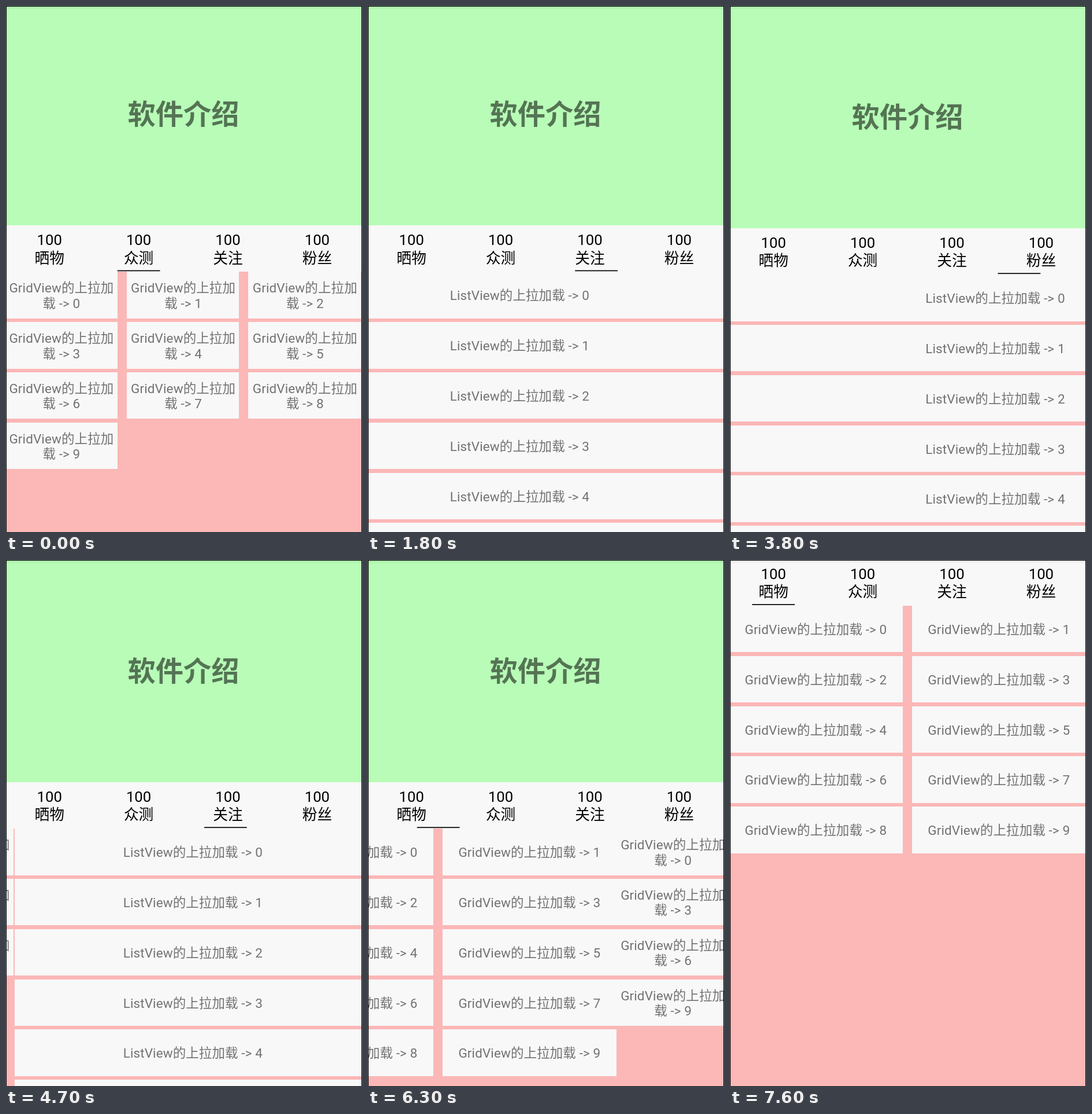
Animation of 616 by 909 pixels, one loop 8000 ms. Source, as an HTML page:

```html
<!DOCTYPE html>
<html lang="zh-CN">
<head>
<meta charset="utf-8">
<title>软件介绍</title>
<style>
  html, body { margin: 0; width: 100%; height: 100%; overflow: hidden; background: #fcb7b7; }
  svg { display: block; width: 616px; height: 909px; }
  rect { shape-rendering: crispEdges; }
  #underline { shape-rendering: auto; }
  text {
    font-family: Roboto, "Noto Sans CJK SC", "Noto Sans CJK", "Noto Sans CJK JP", sans-serif;
    font-kerning: none;
    text-anchor: middle;
  }
  .title { font-size: 48.25px; font-weight: 700; fill: rgba(0, 0, 0, .54); }
  .tab { font-size: 25.7px; }
  .cell { font-size: 22.5px; letter-spacing: .1px; fill: rgba(0, 0, 0, .54); }
</style>
</head>
<body>
<svg viewBox="0 0 616 909">
  <linearGradient id="shadow" x2="0" y2="1">
    <stop stop-opacity=".1"/>
    <stop offset="1" stop-opacity="0"/>
  </linearGradient>
  <rect width="616" height="909" fill="#fcb7b7"/>
  <g id="content">
    <g id="pages"></g>
    <rect y="-4" width="616" height="388" fill="#b8fcb7"/>
    <text class="title" x="307" y="209">软件介绍</text>
    <g id="tabs"><rect y="383.8" width="616" height="80.4" fill="#f8f8f8"/></g>
    <rect id="underline" y="461.4" width="73.8" height="1.7"/>
  </g>
  <rect width="616" height="6" fill="url(#shadow)"/>
  <path d="M0 0H616V909H615V1H1V909H0Z"/>
</svg>
<script>
const LOOP = 8000, STEP = 100;
const PAGE_WIDTH = 617.6, LEFT = -2, TAB_WIDTH = PAGE_WIDTH / 4, UNDERLINE_WIDTH = 73.8;
const ROWS_TOP = 464.2, ROW_HEIGHT = 80.4, ROW_PITCH = 86.8, COLUMN_GAP = 16.1;
const byId = id => document.getElementById(id);

function add(parent, name, attrs, text = '') {
  const node = document.createElementNS('http://www.w3.org/2000/svg', name);
  for (const key in attrs) node.setAttribute(key, attrs[key]);
  node.textContent = text;
  parent.append(node);
  return node;
}

function addText(parent, cls, x, y, text) {
  add(parent, 'text', { class: cls, x, y }, text);
}

function addPage(index, columns, cellWidth, label, wrap) {
  const page = add(byId('pages'), 'g', { transform: `translate(${index * PAGE_WIDTH} 0)` });
  for (let i = 0; i < 10; i++) {
    const x = (i % columns) * (cellWidth + COLUMN_GAP);
    const y = Math.floor(i / columns) * ROW_PITCH;
    const center = x + cellWidth / 2;
    add(page, 'rect', { x, y, width: cellWidth, height: ROW_HEIGHT, fill: '#f8f8f8' });
    if (wrap) {
      addText(page, 'cell', center + .6, y + 36, label + '的上拉加');
      addText(page, 'cell', center + .6, y + 62.4, '载 -> ' + i);
    } else {
      addText(page, 'cell', center, y + 49, label + '的上拉加载 -> ' + i);
    }
  }
}

addPage(0, 2, (PAGE_WIDTH - COLUMN_GAP) / 2, 'GridView', false);
addPage(1, 3, 194.6, 'GridView', true);
addPage(2, 1, PAGE_WIDTH, 'ListView', false);
addPage(3, 1, PAGE_WIDTH, 'ListView', false);

['晒物', '众测', '关注', '粉丝'].forEach((label, i) => {
  const x = LEFT + TAB_WIDTH * (i + .5);
  addText(byId('tabs'), 'tab', x, 418.3, '100');
  addText(byId('tabs'), 'tab', x, 449.4, label);
});

// A move starts slowly under the finger, then flings and settles; power sets how hard.
const move = (start, from, to, steps, power = 3) => ({ start, from, to, steps, power });
const pageMoves = [
  move(600, 1, 2, 8),
  move(1800, 2, 3, 9, 6),
  move(3600, 3, 2, 10),
  move(4700, 2, 1, 10, 2.7),
  move(5800, 1, 0, 11, 3.4)
];
const scrollMoves = [
  move(2900, 4.8, 10.7, 1),
  move(3000, 10.7, 0, 3),
  move(7100, 0, 385.2, 6)
];

function valueAt(moves, time) {
  const current = moves.findLast(m => m.start <= time);
  if (!current) return moves[0].from;
  const { start, from, to, steps, power } = current;
  const t = Math.min(1, (Math.floor((time - start) / STEP) + 1) / steps);
  return from + (to - from) * (1 - (1 - t * t) ** power);
}

function render(time) {
  const page = valueAt(pageMoves, time);
  const underlineX = LEFT + TAB_WIDTH * (page + .5) - UNDERLINE_WIDTH / 2;
  byId('content').setAttribute('transform', `translate(0 ${-valueAt(scrollMoves, time)})`);
  byId('pages').setAttribute('transform', `translate(${LEFT - page * PAGE_WIDTH} ${ROWS_TOP})`);
  byId('underline').setAttribute('x', underlineX);
}

const begin = performance.now();
function tick() {
  render((performance.now() - begin) % LOOP);
  requestAnimationFrame(tick);
}
tick();
</script>
</body>
</html>
```
